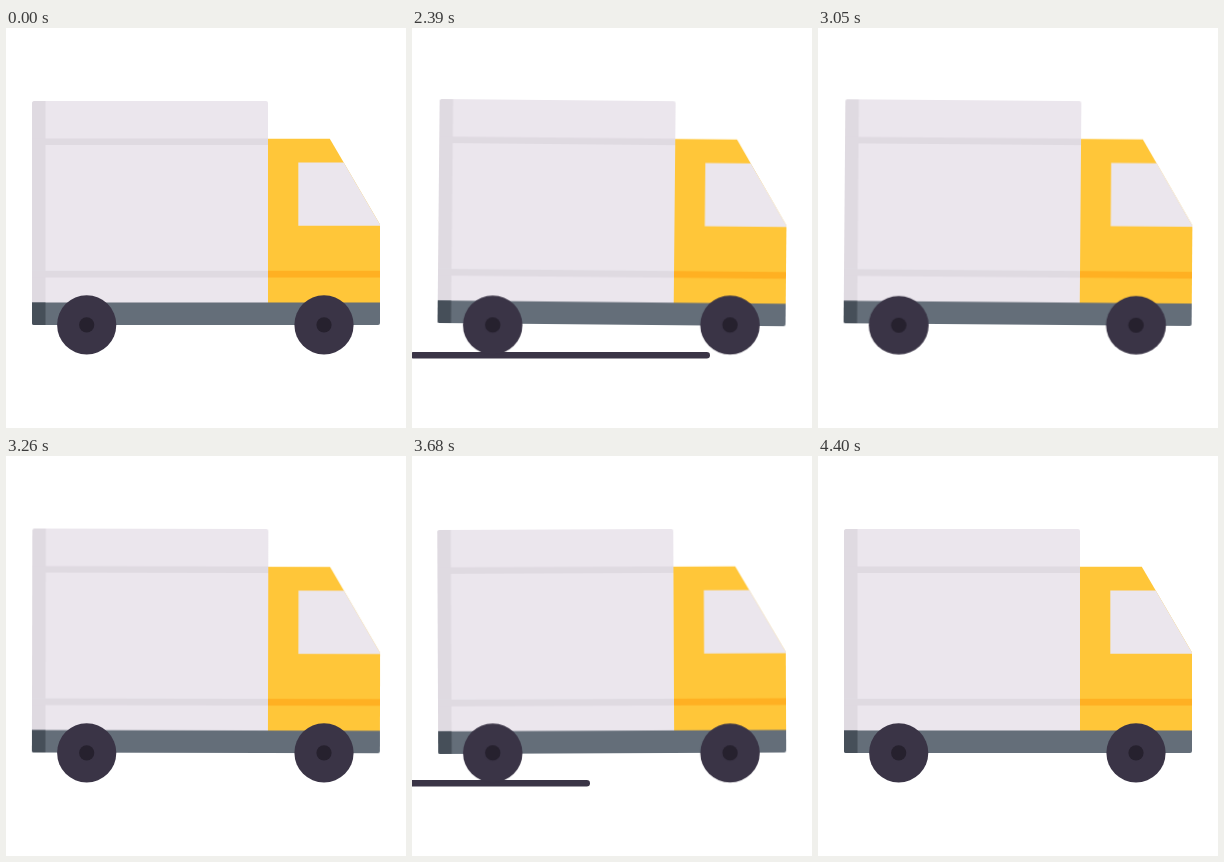
Animation of 400x400 px, one loop 4.43 s. Source, as an HTML page:

```html
<!DOCTYPE html>
<html lang="en">
<head>
<meta charset="utf-8">
<title>Delivery truck</title>
<style>
  html, body { margin: 0; width: 100%; height: 100%; overflow: hidden; background: #fff; }
  svg { display: block; width: 100vw; height: 100vh; }

  .body, .wheel, .road { animation: 4430ms infinite ease-in-out; transform-box: view-box; }
  .body { animation-name: rock; transform-origin: 240px 246px; }
  .wheel { animation-name: squash; }
  .rear { transform-origin: 80.7px 326.3px; }
  .front { transform-origin: 318px 326.3px; }
  .road { animation-name: pass; animation-timing-function: step-end; }

  /* Rest for 2030 ms, then two bumps */
  @keyframes rock {
    0%, 45.824% { transform: rotate(0deg); }
    51.919% { transform: rotate(.8deg); }
    60.722% { transform: rotate(-1.48deg); }
    68.172% { transform: rotate(.47deg); }
    73.589% { transform: rotate(.12deg); }
    79.007% { transform: rotate(.48deg); }
    87.81% { transform: rotate(-1.17deg); }
    94.582%, 100% { transform: rotate(0deg); }
  }
  @keyframes squash {
    0%, 45.824% { transform: scale(1, 1); }
    51.919% { transform: scale(1.02, .98); }
    54.97% { transform: scale(1, 1); }
    60.722% { transform: scale(1.05, .95); }
    66.14% { transform: scale(1, 1); }
    68.172% { transform: scale(1.012, .988); }
    73.589% { transform: scale(1, 1); }
    79.007% { transform: scale(1.012, .988); }
    81.716% { transform: scale(1, 1); }
    87.81% { transform: scale(1.037, .963); }
    94.582%, 100% { transform: scale(1, 1); }
  }
  @keyframes pass {
    0% { transform: translateX(0); }
    46.501%, 73.589% { transform: translateX(0); animation-timing-function: steps(19, end); }
    59.368%, 86.456% { transform: translateX(-760px); }
    100% { transform: translateX(-760px); }
  }
</style>
</head>
<body>
<svg viewBox="0 0 400 400">
  <defs>
    <g id="wheel">
      <circle r="29.6" fill="#3a3446"/>
      <circle r="7.6" fill="#26212e"/>
    </g>
  </defs>
  <rect class="road" x="438" y="324" width="300" height="6.6" rx="3.3" fill="#3a3446"/>
  <g class="body">
    <path d="M26 275V75.5q0-2.5 2.5-2.5H260q2 0 2 2V275z" fill="#ebe6ed"/>
    <path d="M26 275V75.5q0-2.5 2.5-2.5H39.5V275z" fill="#dfdae1"/>
    <path d="M26 110.5H262v6.6H26zM26 242.8H262v6.6H26z" fill="#dfdae1"/>
    <path d="M262 110.8H323.8L374 196.5V275H262z" fill="#ffc639"/>
    <path d="M262 242.8H374v6.6H262z" fill="#ffb022"/>
    <path d="M292.3 134.6H337.7L374 196.5V197.8H292.3z" fill="#ebe6ed"/>
    <path d="M26 274.5H374V295q0 2-2 2H28q-2 0-2-2z" fill="#646e79"/>
    <path d="M26 274.5H39.5V297H28q-2 0-2-2z" fill="#464f59"/>
  </g>
  <g class="wheel rear"><use href="#wheel" x="80.7" y="296.8"/></g>
  <g class="wheel front"><use href="#wheel" x="318" y="296.8"/></g>
</svg>
</body>
</html>
```
